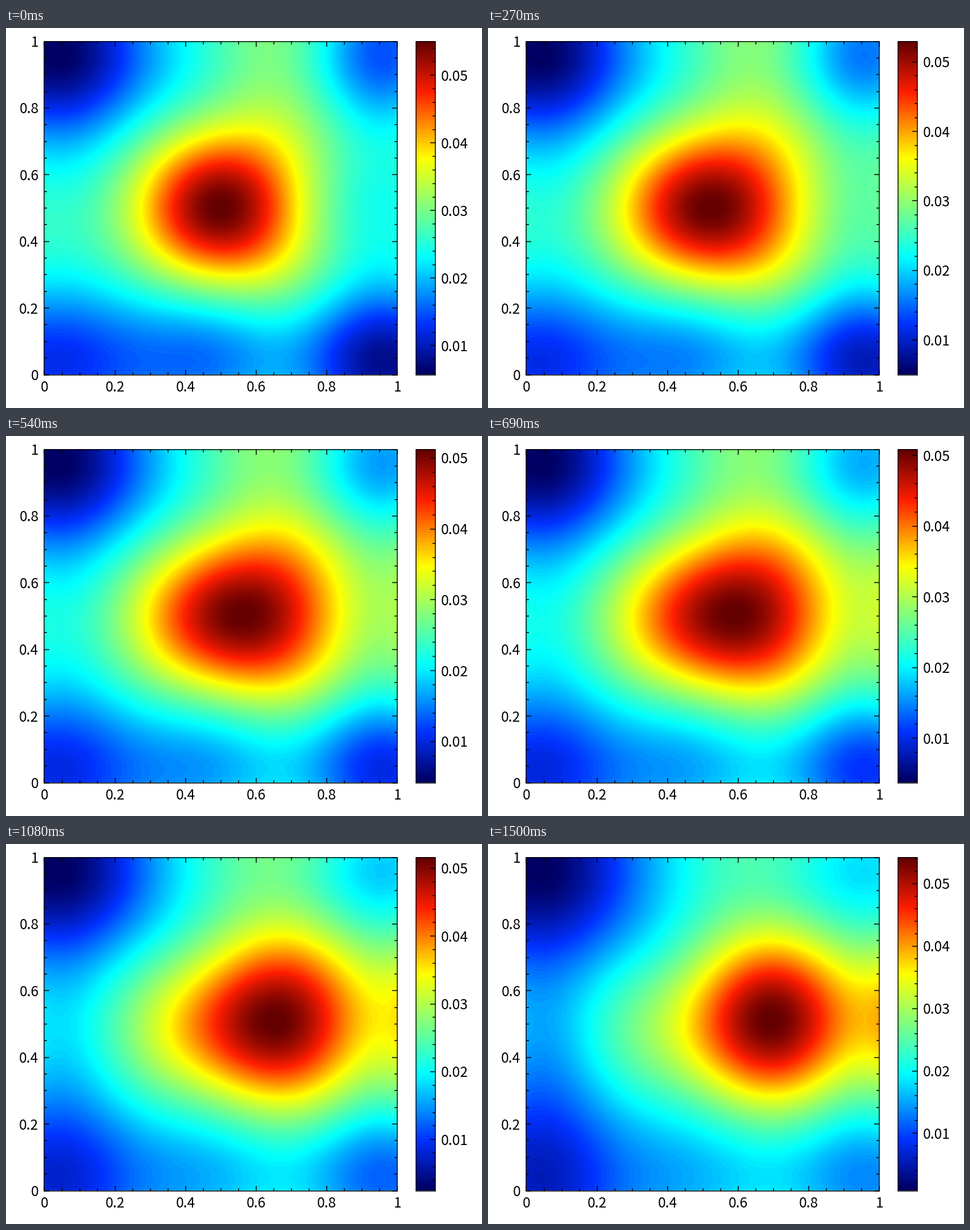
A matplotlib script that plays this animation: 837 px wide and 669 px high, repeating every 1.53 s.

```python
import math

import matplotlib.pyplot as plt
import numpy as np
from matplotlib.animation import FuncAnimation
from matplotlib.collections import LineCollection
from matplotlib.colors import LinearSegmentedColormap

W, H, DPI = 837, 669, 64          # a power-of-two dpi keeps the pixel size exact
PX = 72 / DPI                     # one pixel in points
TICKS, STEP_MS, LAST = 51, 30, 32

LEFT, RIGHT, TOP, BOTTOM = 67.5, 688.5, 23.5, 610.5
BAR_L, BAR_R = 721.5, 755.5
NX, NY = int(RIGHT - LEFT), int(BOTTOM - TOP)
FONT = dict(family="Noto Sans CJK JP", fontsize=24.7 * PX, color="black")

JET = LinearSegmentedColormap.from_list("jet_soft", [
    (0.00, (0, 0, 100 / 255)),
    (0.15, (0, 50 / 255, 1)),
    (0.35, (0, 1, 1)),
    (0.65, (1, 1, 0)),
    (0.85, (1, 30 / 255, 0)),
    (1.00, (100 / 255, 0, 0)),
], N=128)

# Key points: x, y, height at the start and at the end in percent of the range
PEAKS = [(.50, .515, 100, 74), (.70, .515, 70, 100)]
CORNERS = [(.04, .96, 0, 0), (.96, .96, 18, 32),
           (.04, .04, 13.5, 8.5), (.96, .04, 4, 23.5)]
EDGES = [(.50, .96, 43, 39), (.50, .04, 22, 28),
         (.04, .46, 41, 26), (.96, .50, 37, 71)]
SLOPES = [(.27, .73, 41, 29), (.50, .73, 64, 52), (.73, .75, 54, 64),
          (.27, .50, 64, 45),
          (.27, .27, 42, 33), (.50, .27, 57, 48), (.73, .27, 48, 61)]
SPREAD = .22                      # width of the heat kernel
MARGIN = .04                      # the surface is mirrored this far inside the box


def value_range(t):
    s = t - .5
    low = .0057 - .0036 * t - .0013 * t**2
    high = .0508 - .0008 * s + .0223 * s**2 - .028 * s**4
    return low, high


def kernel(a, b):
    """Heat kernel on an interval with insulated ends."""
    m = np.arange(12)
    weight = np.where(m, 2, 1) * np.exp(-(m * np.pi * SPREAD) ** 2 / 2)

    def waves(x):
        u = (np.asarray(x) - MARGIN) / (1 - 2 * MARGIN)
        return np.cos(np.pi * np.outer(u, m))

    return (waves(a) * weight) @ waves(b).T


def surfaces():
    """Smooth surfaces through the key points at the start and the end."""
    x, y, *heights = np.array(PEAKS + CORNERS + EDGES + SLOPES).T
    across = kernel((np.arange(NX) + .5) / NX, x)
    down = kernel(1 - (np.arange(NY) + .5) / NY, y)
    gram = kernel(x, x) * kernel(y, y)
    for t, height in enumerate(heights):
        mean = height.mean()
        pull = np.linalg.solve(gram + 1e-4 * np.eye(len(x)), height - mean)
        low, high = value_range(t)
        yield low + (mean + (down * pull) @ across.T) / 100 * (high - low)


def unit(field):
    return (field - field.min()) / (field.max() - field.min())


def progress(tick):
    return (math.ceil((tick + .965) / 1.57) - 1) / LAST


fig = plt.figure(figsize=(W / DPI, H / DPI), dpi=DPI, facecolor="white")
ax = fig.add_axes([0, 0, 1, 1])
ax.axis("off")


def picture(data, x0, x1):
    return ax.imshow(data, cmap=JET, vmin=0, vmax=1, aspect="auto",
                     extent=(x0, x1, BOTTOM, TOP), interpolation="nearest")


def strokes(segments):
    lines = LineCollection(segments, colors="black", linewidths=1.5 * PX,
                           capstyle="butt", zorder=3)
    return ax.add_collection(lines)


def frame(x0, x1):
    ax.add_patch(plt.Rectangle((x0, TOP), x1 - x0, BOTTOM - TOP, fill=False,
                               ec="black", lw=1.5 * PX, zorder=4))


first, last = surfaces()
heat = picture(unit(first), LEFT, RIGHT)
picture(np.linspace(1, 0, NY)[:, None], BAR_L, BAR_R)
ax.set_xlim(0, W)
ax.set_ylim(H, 0)
frame(LEFT, RIGHT)
frame(BAR_L, BAR_R)

# Ticks point inwards on all four sides of the map
marks = []
for i in range(21):
    x = LEFT + NX * i / 20
    y = BOTTOM - NY * i / 20
    size = 5 if i % 4 else 9
    marks += [[(x, BOTTOM), (x, BOTTOM - size)], [(x, TOP), (x, TOP + size)],
              [(LEFT, y), (LEFT + size, y)], [(RIGHT, y), (RIGHT - size, y)]]
    if i % 4 == 0:
        label = f"{i / 20:g}"
        ax.text(x, 640.5, label, ha="center", va="baseline", **FONT)
        ax.text(57.5, y + 9.5, label, ha="right", va="baseline", **FONT)
strokes(marks)

bar_ticks = strokes([])
bar_labels = [ax.text(765, 0, f"0.0{n}", ha="left", va="baseline", **FONT)
              for n in range(1, 6)]


def update(tick):
    t = progress(tick)
    heat.set_data(unit((1 - t) * first + t * last))

    low, high = value_range(t)

    def bar_y(value):
        return BOTTOM - NY * (value - low) / (high - low)

    segments = []
    for n in range(math.ceil(low / .002), math.floor(high / .002) + 1):
        y = bar_y(n * .002)
        segments.append([(BAR_R, y), (BAR_R - (5 if n % 5 else 9), y)])
    bar_ticks.set_segments(segments)
    for n, label in enumerate(bar_labels, 1):
        label.set_y(bar_y(n * .01) + 9.5)
    return [heat, bar_ticks, *bar_labels]


anim = FuncAnimation(fig, update, frames=TICKS, interval=STEP_MS,
                     repeat=True, repeat_delay=0, blit=False)
plt.show()
```
